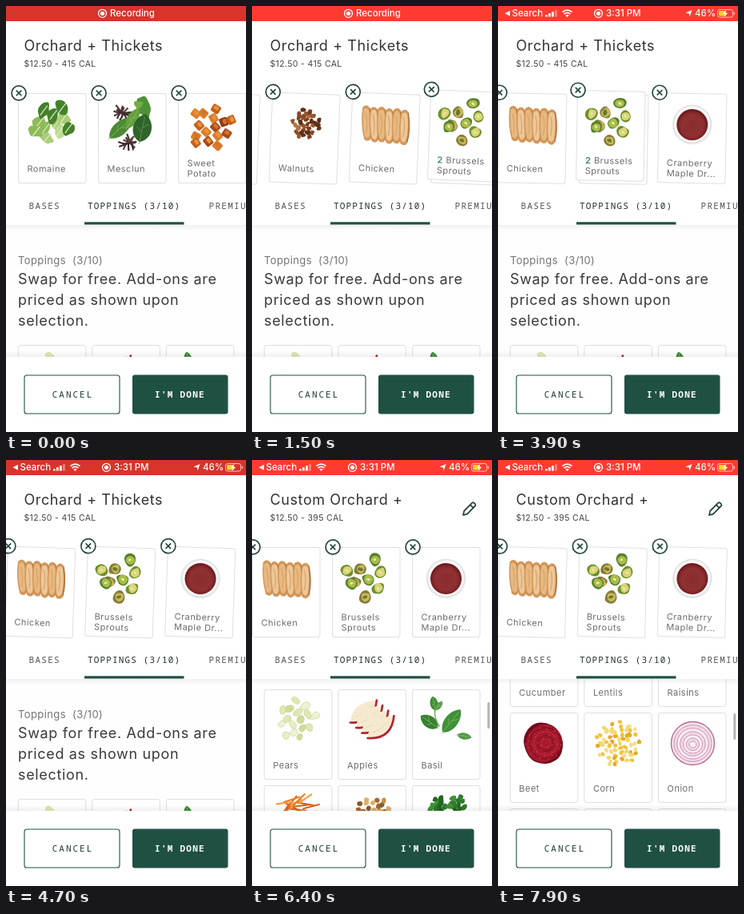
An HTML page that plays this animation: 300x533 px, repeating every 8 s.

```html
<!DOCTYPE html>
<html lang="en">
<head>
<meta charset="utf-8">
<title>Salad builder</title>
<style>
  html, body { margin: 0; width: 100%; height: 100%; overflow: hidden; background: #fefefe; }
  svg { display: block; width: 100vw; height: 100vh; }
  text { font-family: Inter, Roboto, sans-serif; }
  .mono { font-family: "Noto Sans Mono", "DejaVu Sans Mono", monospace; }
</style>
</head>
<body>
<svg id="stage" viewBox="0 0 300 533"></svg>
<script>
const LOOP = 8000;
const GREEN = '#1f5044';

let seed = 7;
function rnd(a = 0, b = 1) {
  seed = (seed * 16807) % 2147483647;
  return a + (b - a) * seed / 2147483647;
}
const pick = list => list[Math.floor(rnd(0, list.length))];
const repeat = (n, fn) => Array.from({ length: n }, (_, i) => fn(i)).join('');
const f = v => v.toFixed(1);

const text = (x, y, str, size, gap, fill, extra = '') =>
  `<text x="${x}" y="${y}" font-size="${size}" letter-spacing="${gap}" fill="${fill}" ${extra}>${str}</text>`;
const circle = (x, y, r, fill, extra = '') =>
  `<circle cx="${f(x)}" cy="${f(y)}" r="${f(r)}" fill="${fill}" ${extra}/>`;
const path = (d, fill, extra = '') => `<path d="${d}" fill="${fill}" ${extra}/>`;
const rect = (x, y, w, h, fill, extra = '') =>
  `<rect x="${x}" y="${y}" width="${w}" height="${h}" fill="${fill}" ${extra}/>`;
const group = (inner, extra = '') => `<g ${extra}>${inner}</g>`;
const outline = (color, w) => `stroke="${color}" stroke-width="${w}"`;

// Rounded irregular shape
function blob(x, y, rx, ry, fill, rough = 0.2, n = 8, extra = '') {
  const turn = rnd(0, 6.28), c = Math.cos(turn), s = Math.sin(turn);
  const pts = Array.from({ length: n }, (_, i) => {
    const a = i / n * 6.283, k = 1 + rnd(-rough, rough);
    const px = Math.cos(a) * rx * k, py = Math.sin(a) * ry * k;
    return [x + px * c - py * s, y + px * s + py * c];
  });
  const mid = i => {
    const p = pts[i % n], q = pts[(i + 1) % n];
    return f((p[0] + q[0]) / 2) + ' ' + f((p[1] + q[1]) / 2);
  };
  let d = 'M' + mid(n - 1);
  pts.forEach((p, i) => { d += `Q${f(p[0])} ${f(p[1])} ${mid(i)}`; });
  return path(d + 'Z', fill, extra);
}

// Points spread evenly over a disc
const scatter = (n, x, y, r, fn) => repeat(n, i => {
  const a = i * 2.4 + rnd(-0.2, 0.2), d = r * Math.sqrt((i + 0.5) / n);
  return fn(x + Math.cos(a) * d, y + Math.sin(a) * d, i);
});

const leaf = (x, y, len, wid, deg, fill, rib = '#8cb86a') => group(
  path(`M0 ${-len}C${wid} ${-len * 0.6} ${wid * 1.2} ${len * 0.6} 0 ${len}C${-wid * 1.2} ${len * 0.6} ${-wid} ${-len * 0.6} 0 ${-len}Z`, fill) +
  path(`M0 ${-len * 0.8}V${len * 1.15}M0 0L${wid * 0.5} ${-len * 0.35}M0 ${len * 0.3}L${-wid * 0.5} 0`, 'none', outline(rib, 0.7)),
  `transform="translate(${x} ${y}) rotate(${deg})"`);

const frisee = (x, y, r) => repeat(13, i => {
  const a = i / 13 * 6.28 + rnd(0, 0.5), d = r * rnd(0.6, 1.1);
  const ex = x + Math.cos(a) * d, ey = y + Math.sin(a) * d * 0.8;
  return path(`M${x} ${y}Q${f(x + rnd(-4, 4))} ${f(y + rnd(-4, 4))} ${f(ex)} ${f(ey)}`, 'none', outline(pick(['#4d3237', '#5d4a3c', '#3c2a2c']), 2.2));
});

const sprig = (x, y) => path(`M${x} ${y}Q${x + 3} ${y + 16} ${x - 4} ${y + 32}`, 'none', outline('#6aa548', 1.5)) +
  scatter(11, x, y, 10, (px, py) => blob(px, py, 4.5, 3.5, pick(['#2f7a2c', '#3f9136', '#256522']), 0.4));

const art = {
  Romaine: () => scatter(11, 42, 38, 24, (x, y) =>
    blob(x, y, 7, 10, pick(['#5c9634', '#8dbb59', '#a9cd78', '#45812c', '#bfdb94']), 0.32, 9) +
    path(`M${f(x - 4)} ${f(y + 6)}Q${f(x)} ${f(y)} ${f(x + 5)} ${f(y - 6)}`, 'none', outline('#d9e8ba', 1.3))),
  Mesclun: () => frisee(29, 24, 13) + frisee(38, 61, 13) +
    blob(56, 18, 15, 9, '#4f9136', 0.35, 11) + blob(50, 14, 7, 5, '#72ad48', 0.35) +
    leaf(28, 43, 19, 10, 48, '#4b8a33') + leaf(43, 31, 15, 8, 32, '#63a03e') +
    leaf(55, 43, 18, 14, 12, '#2f6429', '#6c9a58'),
  Sweet: () => scatter(15, 41, 42, 28, (x, y) => group(
    rect(-5.5, -5, 11, 10, pick(['#c4601e', '#dc7c2a', '#a8481c', '#8e3b17']), 'rx="2"') +
    rect(-3.5, -3.5, 6.5, 4.5, pick(['#e8923a', '#d6732a']), 'rx="1.5"'),
    `transform="translate(${f(x)} ${f(y)}) rotate(${f(rnd(0, 90))})"`)),
  Walnuts: () => scatter(30, 43, 38, 18, (x, y) =>
    blob(x, y, 3.8, 3, pick(['#7a3f20', '#96562e', '#5e2f19', '#b0733f', '#8a4a2a']), 0.35)),
  Chicken: () => repeat(6, i => {
    const x = 19 + i * 9.4, y = 38 + (i % 2) + i * 0.5;
    return group(
      path('M-4 -20Q1 -25 5 -19Q9 2 5 19Q1 25 -4 20Q-8 0 -4 -20Z', '#d3965a') +
      path('M-3 -17Q1 -21 3.5 -16Q6 2 3 16Q0 21 -3 16Q-6 0 -3 -17Z', i % 2 ? '#edc797' : '#e6b981') +
      path('M-1 -13Q2 -2 -1 12', 'none', outline('#d9a56c', 1.2)) +
      path('M4.6 -18Q8.5 2 4.6 18', 'none', outline('#9f6130', 1)),
      `transform="translate(${x} ${y}) rotate(${-5 + i})"`);
  }),
  Brussels: () => [[18, 29], [35, 27], [53, 15], [60, 31], [28, 44], [45, 40], [57, 51], [41, 62], [24, 45]].map(([x, y], i) =>
    blob(x, y, 8.5, 7.5, ['#6f8f2b', '#8a7a35', '#58802a'][i % 3], 0.15) +
    blob(x + 0.5, y, 6.2, 5.4, ['#d8d57a', '#a9bd4a', '#c9b660'][(i * 2) % 3], 0.2) +
    (i % 3 === 1 ? blob(x, y, 3.5, 2.5, '#5f7d25', 0.3) : blob(x, y, 2.3, 1.6, '#f0e6a6', 0.3))).join(''),
  Cranberry: () => circle(42, 39, 25, '#ececec') + circle(42, 38.5, 23.3, '#f8f7f7', outline('#d8d5d5', 0.8)) +
    circle(42, 39, 19.5, '#6f1c20') + circle(42, 40, 18, 'url(#sauce)'),
  Pears: () => scatter(16, 41, 38, 25, (x, y) =>
    blob(x, y, 6.5, 4.6, pick(['#eef1d2', '#dfe8b4', '#e7edc6', '#cfdc98']), 0.3, 6, outline('#c3d18a', 0.6))),
  Apples: () => repeat(4, i => group(
    path('M48 13Q17 15 15 41Q45 43 48 13Z', '#f5ead0') +
    path('M15 41Q45 43 48 13', 'none', outline('#b3242f', 2.6) + ' stroke-linecap="round"') +
    path('M21 34Q32 31 42 19', 'none', outline('#e6d4a8', 0.8)),
    `transform="translate(${i * 7.2} ${i * 6.5})"`)),
  Basil: () => leaf(27, 17, 9, 6, -12, '#3c8a37') + leaf(33, 20, 7, 4, 40, '#4f9d45') +
    leaf(21, 40, 13, 9, -55, '#35812f') + leaf(49, 39, 18, 10, 38, '#3f9139') + leaf(65, 58, 9, 5, 100, '#4b9a41') +
    path('M28 24Q27 36 34 46', 'none', outline('#6ba957', 1.4)),
  Carrots: () => scatter(34, 42, 36, 22, (x, y) => {
    const a = rnd(-0.9, 0.5), c = Math.cos(a) * 11, s = Math.sin(a) * 11;
    return path(`M${f(x - c)} ${f(y - s)}L${f(x + c)} ${f(y + s)}`, 'none', outline(pick(['#ee7a22', '#f59a3d', '#d9611a']), 2));
  }),
  Chickpeas: () => scatter(34, 44, 37, 23, (x, y) =>
    blob(x, y, 3.8, 3.3, pick(['#c48b45', '#a5672d', '#ddb06b', '#8b5a2c']), 0.2)),
  Cilantro: () => sprig(31, 25) + sprig(56, 23) + sprig(42, 44),
  Cucumber: () => scatter(9, 42, 38, 22, (x, y) =>
    circle(x, y, 9, '#dcebb9', outline('#4b8038', 1.6)) + circle(x, y, 4, '#eaf3d2')),
  Lentils: () => scatter(80, 42, 38, 25, (x, y) => circle(x, y, 2, pick(['#6b5a38', '#85724a', '#544427']))),
  Raisins: () => scatter(26, 42, 38, 23, (x, y) => blob(x, y, 4.6, 3.2, pick(['#4a2320', '#65342b', '#371a1a']), 0.2)),
  Beet: () => blob(42, 38, 27.5, 25, '#6d0e1d', 0.04, 12) + blob(42, 38, 25, 23, '#a3182b', 0.03, 12) +
    repeat(4, i => circle(44, 38, 5 + i * 4.8, 'none', outline(i % 2 ? '#7d1021' : '#c02a3c', 1.1))) +
    scatter(40, 42, 38, 23, (x, y) => circle(x, y, 0.8, '#d0414e')),
  Corn: () => scatter(62, 42, 38, 28, (x, y, i) =>
    blob(x, y, i < 38 ? 3.4 : 3, 2.6, pick(['#f2c23c', '#f7d566', '#e5a928', '#f5dc8a']), 0.2)),
  Onion: () => circle(43, 38, 27, '#f5e6ee', outline('#b56a90', 1.4)) +
    repeat(6, i => `<ellipse cx="43" cy="${f(38 + i * 0.3)}" rx="${23.5 - i * 3.8}" ry="${23 - i * 3.8}" fill="${i % 2 ? '#f9eef3' : '#f1d9e5'}" ${outline('#cf91b0', 1)}/>`)
};

const frame = (x = 0, y = 0) => rect(x, y, 84.5, 112, '#fff', 'rx="2.5" ' + outline('#dedfe4', 1));
const badge = circle(0.5, -0.5, 9, '#fff', outline('#24483f', 1.7)) +
  path('M-2.8 -3.8L3.8 2.8M3.8 -3.8L-2.8 2.8', 'none', outline('#24483f', 1.7));

function face(key, lines) {
  const top = lines.length > 1 ? 91 : 98;
  return frame() + (art[key] ? art[key]() : '') +
    lines.map((l, i) => text(11, top + i * 13, l, 11, 0.5, '#6c6c6c')).join('');
}

const chosen = [
  ['Romaine', ['Romaine']], ['Mesclun', ['Mesclun']], ['Sweet', ['Sweet', 'Potato']], ['Apples', ['Apples']],
  ['Walnuts', ['Walnuts']], ['Chicken', ['Chicken']], ['Brussels', ['Brussels', 'Sprouts']],
  ['Cranberry', ['Cranberry', 'Maple Dr...']]
];
function chosenCard([key, lines]) {
  if (key !== 'Brussels') return group(face(key, lines) + badge, 'class="card"');
  const two = '<tspan fill="#3f8a72" font-weight="600">2</tspan> Brussels';
  const pair = frame(2, 1) + group(face(key, [two, lines[1]]) + badge, 'transform="translate(-2 -3)"');
  return group(group(pair, 'id="pair"') + group(face(key, lines) + badge, 'id="single"'), 'class="card"');
}

const rows = [
  ['Pears', 'Apples', 'Basil'], ['Carrots', 'Chickpeas', 'Cilantro'],
  ['Cucumber', 'Lentils', 'Raisins'], ['Beet', 'Corn', 'Onion'], ['', '', '']
];
const listCards = rows.map((row, r) => row.map((name, c) =>
  group(face(name, [name]), `transform="translate(${15.3 + c * 92.6} ${424.5 + r * 120})"`)).join('')).join('');

const copy = ['Swap for free. Add-ons are', 'priced as shown upon', 'selection.']
  .map((l, i) => text(15, 347.5 + i * 26, l, 18, 0.66, '#3a3a3a')).join('');

const recordDot = x => circle(x, 9.3, 5, 'none', outline('#fff', 1.3)) + circle(x, 9.3, 2.6, '#fff');
const status = (x, str, extra = '') => text(x, 13.4, str, 11.5, 0, '#fff', 'font-weight="500" ' + extra);

const statusRecording = recordDot(120.5) + status(130, 'Recording');
const statusFull = path('M8.5 9.3L15 5.8V12.8Z', '#fff') + status(17.5, 'Search') +
  repeat(4, i => rect(59 + i * 4, 11 - i * 2, 2.8, 2.6 + i * 2, '#fff', `rx="0.7" opacity="${i < 3 ? 1 : 0.4}"`)) +
  path('M80.5 7.6Q86.5 2.6 92.5 7.6M82.6 10Q86.5 6.8 90.4 10', 'none', outline('#fff', 1.8)) +
  path('M84.3 11.7Q86.5 9.8 88.7 11.7L86.5 14Z', '#fff') +
  recordDot(125.5) + status(135, '3:31 PM') +
  path('M242.5 5L239.6 13.6L238.6 9.3L234.4 8.4Z', '#fff') + status(246, '46%') +
  rect(274.5, 4.5, 19, 9.6, 'none', 'rx="2.6" ' + outline('#ffffffb0', 1)) +
  rect(276, 6, 8.5, 6.6, '#ffd426', 'rx="1.3"') + rect(294.7, 7.6, 1.2, 3.4, '#ffffffb0', 'rx="0.6"') +
  path('M285.5 4.6L281 9.9H283.8L282.6 14L287.2 8.7H284.4Z', '#fff');

const titleBlock = (name, cal) => text(22.5, 56, name, 18, 0.6, '#333') +
  text(22.5, 76, `$12.50 - ${cal} CAL`, 10.5, 0.35, '#444');
const pencil = path('M264 69L265.2 63.6L275.2 53.6Q276.3 52.6 277.4 53.6L279 55.2Q280 56.3 279 57.4L269 67.6ZM272.8 56L276.6 59.8', 'none',
  outline('#1f3d36', 1.7) + ' stroke-linejoin="round"');

const mono = (x, y, str, gap, fill, weight, extra = '') =>
  text(x, y, str, 11, gap, fill, `class="mono" font-weight="${weight}" ${extra}`);

document.getElementById('stage').innerHTML = `
  <defs>
    <radialGradient id="sauce"><stop offset="0" stop-color="#8a2c2e"/><stop offset="0.75" stop-color="#8f3032"/><stop offset="1" stop-color="#7a2226"/></radialGradient>
    <linearGradient id="down" x2="0" y2="1"><stop stop-color="#000" stop-opacity="0.055"/><stop offset="1" stop-color="#000" stop-opacity="0"/></linearGradient>
    <linearGradient id="up" y1="1" x2="0" y2="0"><stop stop-color="#000" stop-opacity="0.06"/><stop offset="1" stop-color="#000" stop-opacity="0"/></linearGradient>
    <clipPath id="view"><rect y="274" width="300" height="165"/></clipPath>
  </defs>` +
  rect(0, 0, 300, 533, '#fefefe') +
  group(group(text(15, 323, 'Toppings&#160; (3/10)', 13, 0.4, '#747474') + copy + listCards, 'id="list"'), 'clip-path="url(#view)"') +
  rect(294.3, 0, 3, 33, '#b4b4b6', 'rx="1.5" id="bar"') +
  rect(0, 19, 300, 255, '#fff') + rect(0, 274, 300, 7, 'url(#down)') +
  group(titleBlock('Orchard + Thickets', 415), 'id="before"') +
  group(titleBlock('Custom Orchard +', 395) + pencil, 'id="after"') +
  chosen.map(chosenCard).join('') +
  mono(28.5, 254, 'BASES', 1.3, '#555', 400) +
  mono(102, 254, 'TOPPINGS (3/10)', 1.15, '#1f2f2b', 500) +
  mono(253.5, 254, 'PREMIUMS', 1.3, '#555', 400) +
  rect(98, 270.3, 124.5, 3.2, GREEN) +
  rect(0, 431, 300, 8, 'url(#up)') + rect(0, 439, 300, 94, '#fff') +
  rect(23, 462, 119, 48, '#fff', 'rx="3" ' + outline(GREEN, 1.1)) +
  rect(158, 461.5, 119.5, 49, GREEN, 'rx="3"') +
  mono(83.5, 490, 'CANCEL', 2, '#1f3d36', 500, 'text-anchor="middle"') +
  mono(217.5, 490, "I'M DONE", 1.25, '#fff', 600, 'text-anchor="middle"') +
  rect(0, 0, 300, 19, '#ff3b30', 'id="red"') +
  group(statusRecording, 'id="recording"') + group(statusFull, 'id="full"');

const el = id => document.getElementById(id);
const cards = [...document.querySelectorAll('.card')];
const show = (id, on) => { el(id).style.display = on ? '' : 'none'; };

// Eased value from [time, value] steps
function track(steps, t) {
  let [t0, v0] = steps[0];
  for (const [t1, v1] of steps) {
    if (t < t1) {
      const k = (t - t0) / (t1 - t0);
      return v0 + (v1 - v0) * k * k * (3 - 2 * k);
    }
    [t0, v0] = [t1, v1];
  }
  return v0;
}
const swipe = [[0, 0], [350, 0], [1400, 392], [1900, 392], [2500, 522], [2750, 522], [3200, 515]];
const scroll = [[0, 0], [5750, 0], [6350, 137], [6750, 137], [7650, 468]];

function draw(t) {
  const x = track(swipe, t), y = track(scroll, t);
  const tilt = 1.5 * (1 - Math.cos(0.01973 * t - 0.314));
  cards.forEach((c, i) => c.setAttribute('transform',
    `translate(${(15.5 + i * 100 - x).toFixed(2)} 109.5) rotate(${tilt.toFixed(3)} 42 56)`));
  el('list').setAttribute('transform', `translate(0 ${-y.toFixed(2)})`);
  el('bar').setAttribute('y', 297.2 + y * 0.0423);
  el('bar').setAttribute('opacity', Math.max(0, Math.min(1, (t - 5750) / 150)));

  const dim = Math.max(0, Math.cos(t / 2340 * 2 * Math.PI)) ** 5;
  el('red').setAttribute('fill', `rgb(${255 - 40 * dim},${59 - 7 * dim},${48 - 6 * dim})`);
  show('recording', t < 2100);
  show('full', t >= 2100);
  show('pair', t < 4500);
  show('single', t >= 4500);
  show('before', t < 4800);
  show('after', t >= 4800);
}

const start = performance.now();
function tick(now) {
  draw(Math.max(0, now - start) % LOOP);
  requestAnimationFrame(tick);
}
draw(0);
requestAnimationFrame(tick);
</script>
</body>
</html>
```
